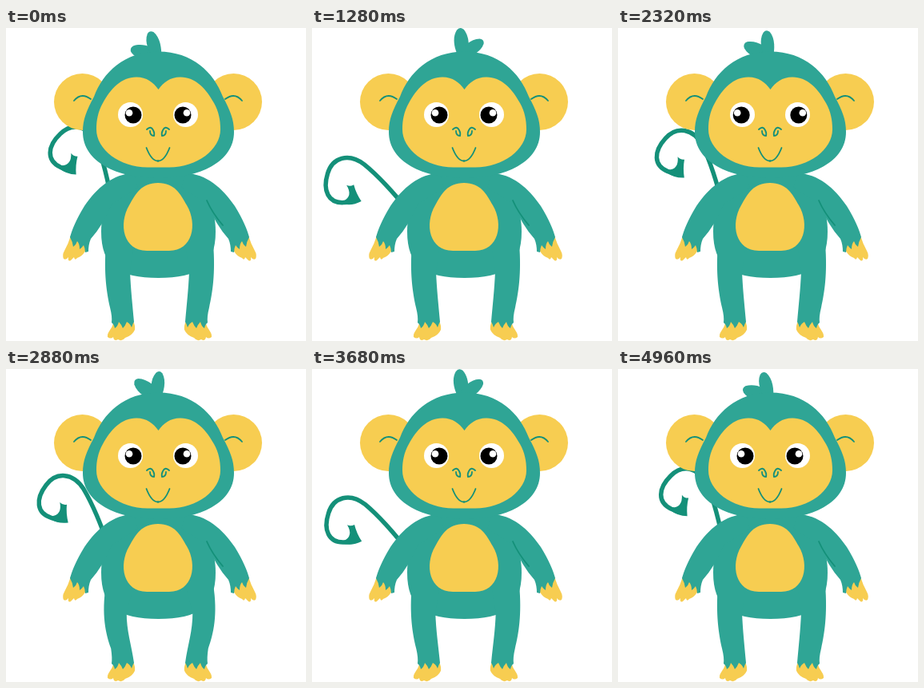
An HTML page that plays this animation: 375x392 px, repeating every 5000 ms.

```html
<!DOCTYPE html>
<html lang="en">
<head>
<meta charset="utf-8">
<title>Monkey</title>
<style>
  html, body { margin: 0; width: 100%; height: 100%; overflow: hidden; background: #fff; }
  svg { display: block; width: 375px; height: 392px; }
  .teal { fill: #2fa595; }
  .yellow { fill: #f7cd51; }
  .line { fill: none; stroke: #149079; stroke-width: 1.8; stroke-linecap: round; }
</style>
</head>
<body>
<svg viewBox="0 0 375 392">
  <defs>
    <path id="leaf" class="teal" d="M-4 5C-9 -6 -11 -20 -4 -29Q0 -33 4 -29C10 -20 8 -7 4 5Z"/>
    <g id="limb">
      <path class="yellow" d="M81 260Q78 270 73 279Q70 284 72 289Q75 291 78 287Q77 293 81 291L85 287Q86 292 89 288Q95 286 98 281L101 277L100 266Z"/>
      <path class="teal" d="M160 182C134 182 113 201 98 223C88 239 82 254 80 262Q83 267 84 274Q88 271 89 267Q92 270 92 277Q95 275 97 272Q99 276 99 281L103 280Q103 271 106 264Q122 246 132 221L165 200Z"/>
      <path class="yellow" d="M134 364C136 376 126 379 127 387Q131 390 134 387Q135 393 140 390Q145 393 149 388Q158 385 161 378Q162 371 157 364Z"/>
      <path id="leg" class="teal"/>
    </g>
    <circle id="ear" class="yellow" cx="95.500" cy="92.500" r="35.500"/>
    <g id="features">
      <path class="line" d="M85 91Q94 80 106 89"/>
      <path class="line" d="M176 127Q181 122 184 128Q186 132 185 135Q180 135 180 129"/>
      <path class="line" d="M175.500 150Q182 167 190.500 166.500"/>
      <circle cx="155.500" cy="108.500" r="15.500" fill="#fff"/>
      <g id="pupil">
        <circle cx="159" cy="109" r="10.500"/>
        <circle cx="154" cy="106.300" r="4.300" fill="#fff"/>
      </g>
    </g>
  </defs>

  <g id="tail">
    <path class="line" style="stroke-width:5.500" d="M125 228C112 205 95 178 79 160C62 142 41 145 32 164C22 184 27 201 46 203Q54 204.500 61 203"/>
    <path fill="#149079" d="M46 201Q59 197 53 182Q57 185 62 183Q63 194 68 205Q56 209 46 205Z"/>
  </g>

  <use href="#ear"/>
  <use href="#ear" transform="translate(380) scale(-1 1)"/>
  <use href="#leaf" id="leafLeft"/>
  <use href="#leaf" id="leafRight"/>

  <path class="teal" d="M150 182H231C250 200 262 225 262 255C262 298 240 313 190.500 313C141 313 119 298 119 255C119 225 131 200 150 182Z"/>
  <use href="#limb"/>
  <use href="#limb" transform="translate(384) scale(-1 1)"/>
  <path class="line" d="M251 216Q258 232 271 247"/>
  <path class="yellow" d="M190 194C211 194 218 208 226 222C240 246 233 279 204 279H176C147 279 140 246 154 222C162 208 169 194 190 194Z"/>

  <path class="teal" d="M190.500 29.500C233 29.500 260 56 271 86C280 103 285 114 285 130C285 168 242 188 190.500 188C139 188 96 168 96 130C96 114 101 103 110 86C121 56 148 29.500 190.500 29.500Z"/>
  <path class="yellow" d="M190.500 77C184 68 176 61.500 163 61.500C144 61.500 131 76 121 94C115 105 113 115 113 127C113 152 142 174.500 177 174.500H204C239 174.500 268 152 268 127C268 115 266 105 260 94C250 76 237 61.500 218 61.500C205 61.500 197 68 190.500 77Z"/>
  <use href="#features"/>
  <use href="#features" transform="translate(380) scale(-1 1)"/>
</svg>
<script>
  const $ = id => document.getElementById(id);
  const set = (id, name, value) => $(id).setAttribute(name, value);
  const LOOP = 5000, SWING = 2500;

  // Linear rise and fall from 0 to 1 and back between two times.
  const pulse = (t, start, end) =>
    Math.max(0, 1 - Math.abs(2 * (t - start) / (end - start) - 1));

  function draw(t) {
    const phase = t % SWING;
    const swing = pulse(phase, 0, SWING);
    const bend = pulse(phase, 0, SWING / 2);
    const hair = -17 + 72 * swing;

    set('tail', 'transform', `rotate(${20 - 30 * swing} 139 250)`);
    set('leafRight', 'transform', `translate(189 34) rotate(${hair})`);
    set('leafLeft', 'transform', `translate(189 34) rotate(${hair - 60}) scale(1.1)`);

    set('leg', 'd', `M125 270C${122 - 5 * bend} 308 ${126 - 2 * bend} 332 ${130 + 2 * bend} 350
      Q133 362 132 369Q135 371 136 376Q140 373 141 368Q144 371 146 376Q149 373 151 368
      Q155 370 157 375Q158 371 160 368C${158 - 2 * bend} 345 ${156 - 9 * bend} 328 ${155 - 7 * bend} 305L160 270Z`);

    const look = pulse(t, 1840, 2840) + pulse(t, 3720, 4800);
    set('pupil', 'transform', `translate(${-5 * look})`);
  }

  function tick() {
    draw(performance.now() % LOOP);
    requestAnimationFrame(tick);
  }
  tick();
</script>
</body>
</html>
```
